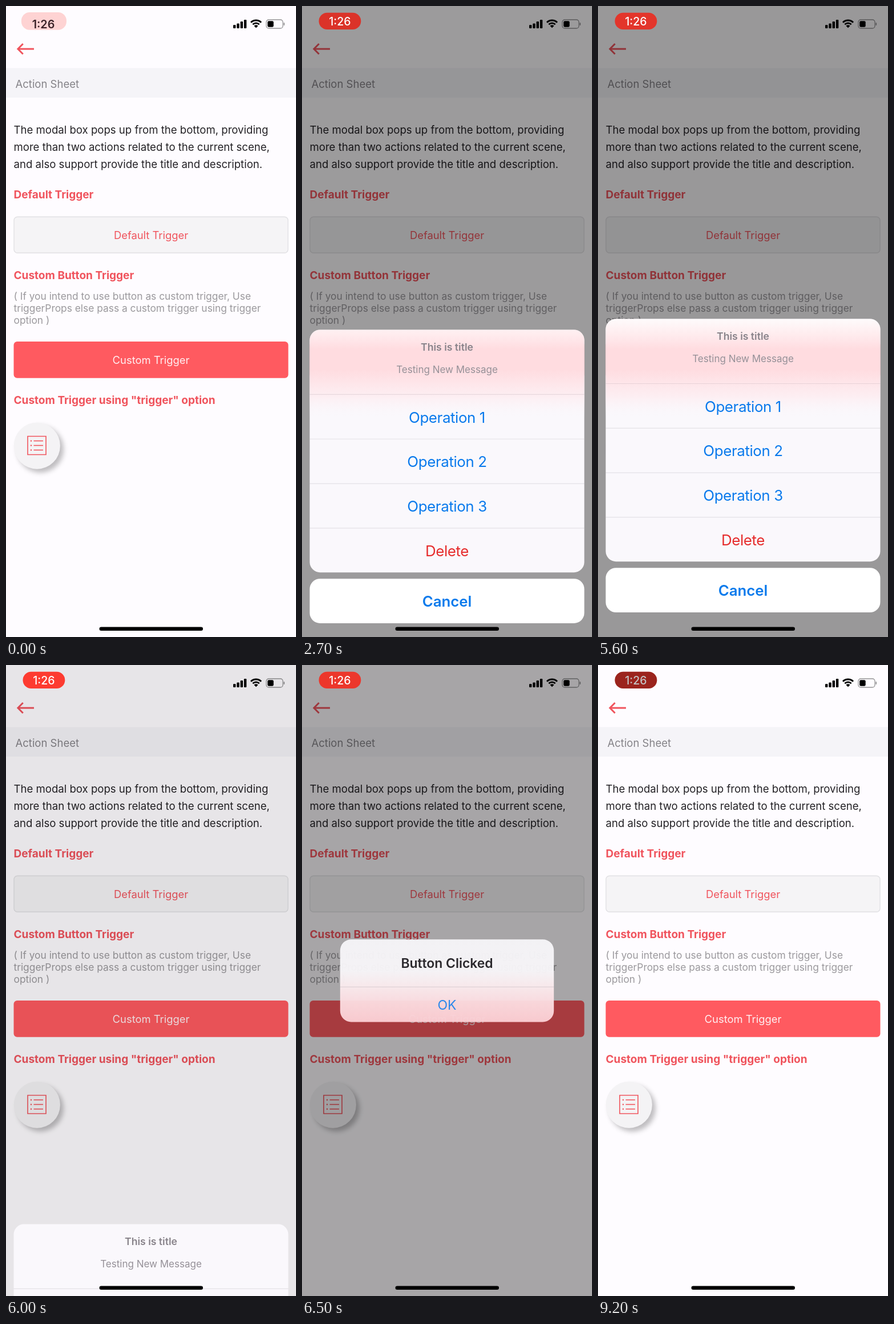
Write an HTML page with a canvas that moves like this. It is 508 by 1102 pixels and loops after 9.3 s.

```html
<!DOCTYPE html>
<html lang="en">
<head>
<meta charset="utf-8">
<title>Action Sheet</title>
<style>
  html, body { margin: 0; width: 100%; height: 100%; overflow: hidden; background: #fefcff; }
  canvas { display: block; width: 508px; height: 1102px; }
</style>
</head>
<body>
<canvas id="stage"></canvas>
<script>
const W = 508, H = 1102, LOOP = 9300, STEP = 100;
const MID = W / 2;
const RED = '#ff5a60', HEADING = '#f0545d', BLUE = '#0a7aec', BODY = '#242226';
const canvas = document.getElementById('stage');
const ctx = canvas.getContext('2d');
const ratio = window.devicePixelRatio || 1;
canvas.width = W * ratio;
canvas.height = H * ratio;

// Critically damped spring: the share of the way still to go.
const remaining = ms => {
  if (ms <= 0) return 1;
  const x = 18.26 * ms / 1000;
  return (1 + x) * Math.exp(-x);
};
const openness = (t, start, end) => t < end ? 1 - remaining(t - start) : remaining(t - end);

// y is the vertical middle of the capitals.
function text(str, x, y, size, color, { weight = 400, align = 'left', spacing = 0 } = {}) {
  ctx.font = `${weight} ${size}px Inter, sans-serif`;
  ctx.letterSpacing = spacing + 'px';
  ctx.textAlign = align;
  ctx.fillStyle = color;
  ctx.fillText(str, x, y + size * 0.364);
}

function box(x, y, w, h, r, fill, stroke, lineWidth = 1.4) {
  ctx.beginPath();
  ctx.roundRect(x, y, w, h, r);
  if (fill) {
    ctx.fillStyle = fill;
    ctx.fill();
  }
  if (stroke) {
    ctx.strokeStyle = stroke;
    ctx.lineWidth = lineWidth;
    ctx.stroke();
  }
}

function line(points, color, width) {
  ctx.beginPath();
  points.forEach(([x, y]) => ctx.lineTo(x, y));
  ctx.strokeStyle = color;
  ctx.lineWidth = width;
  ctx.stroke();
}

function gradient(y0, y1, stops) {
  const g = ctx.createLinearGradient(0, y0, 0, y1);
  stops.forEach(([at, color]) => g.addColorStop(at, color));
  return g;
}

function drawStatusIcons() {
  [6, 8.5, 12, 15].forEach((h, i) => box(398 + i * 6.3, 39 - h, 4.4, h, 1.2, '#000'));

  const from = -Math.PI * 0.75, to = -Math.PI * 0.25;
  ctx.strokeStyle = ctx.fillStyle = '#000';
  ctx.lineWidth = 2.8;
  for (const r of [12.8, 8]) {
    ctx.beginPath();
    ctx.arc(438, 37.8, r, from, to);
    ctx.stroke();
  }
  ctx.beginPath();
  ctx.moveTo(438, 38.2);
  ctx.arc(438, 38.2, 5, from, to);
  ctx.fill();

  box(456, 24, 29, 15, 4.3, null, 'rgba(0,0,0,.42)', 1.3);
  box(458.2, 26.2, 10.5, 10.6, 2.2, '#000');
  box(486.3, 29, 1.8, 5, 1, 'rgba(0,0,0,.42)');
}

function drawListButton() {
  ctx.save();
  ctx.shadowColor = 'rgba(0,0,0,.25)';
  ctx.shadowBlur = 9 * ratio;
  ctx.shadowOffsetX = ctx.shadowOffsetY = 6 * ratio;
  box(13.7, 727.5, 81.2, 81.2, 40.6, '#f4f3f5');
  ctx.restore();
  box(38, 751.5, 32, 32, 0, null, HEADING, 1.6);
  for (const y of [759.5, 767.5, 775.5]) {
    box(42.8, y - 1.2, 2.4, 2.4, 1.2, HEADING);
    line([[48.5, y], [65, y]], HEADING, 1.6);
  }
}

function drawPage() {
  ctx.fillStyle = '#fefcff';
  ctx.fillRect(0, 0, W, H);

  line([[21.5, 75], [49, 75]], HEADING, 3);
  line([[29.8, 66], [20.9, 75], [29.8, 84]], HEADING, 3);

  ctx.fillStyle = '#f5f4f8';
  ctx.fillRect(0, 108.5, W, 51.5);
  text('Action Sheet', 16.5, 136.5, 18.5, '#858388');

  ['The modal box pops up from the bottom, providing',
   'more than two actions related to the current scene,',
   'and also support provide the title and description.'
  ].forEach((str, i) => text(str, 13.5, 216 + i * 30, 18.58, BODY));

  const heading = (str, y) => text(str, 13.5, y, 19.05, HEADING, { weight: 700 });
  const label = (str, y, color) => text(str, MID, y, 18.4, color, { align: 'center' });

  heading('Default Trigger', 329);
  box(14, 368.2, 480, 63, 6, '#f5f4f6', '#e2e1e4');
  label('Default Trigger', 400, HEADING);

  heading('Custom Button Trigger', 470);
  ['( If you intend to use button as custom trigger, Use',
   'triggerProps else pass a custom trigger using trigger',
   'option )'
  ].forEach((str, i) => text(str, 13.5, 507 + i * 21, 17.36, '#9b999d'));

  box(13.5, 586, 481, 63.7, 6, RED);
  label('Custom Trigger', 618, '#fff0f2');

  heading('Custom Trigger using "trigger" option', 688.5);
  drawListButton();
  drawStatusIcons();
}

function drawBackdrop(amount) {
  ctx.fillStyle = `rgba(0,0,0,${0.4 * amount})`;
  ctx.fillRect(0, 0, W, H);
}

function drawSheet(open) {
  const top = 546.5 + (H - 546.5) * (1 - open);
  const centered = { align: 'center' };
  box(13.5, top, 481, 423.7, 18, '#faf8fc');

  // The red button glows through the panel at a fixed place on screen.
  ctx.save();
  ctx.clip();
  ctx.fillStyle = gradient(540, 720, [
    [0, 'rgba(255,255,255,.8)'], [0.1, 'rgba(255,244,245,.9)'],
    [0.33, 'rgba(255,220,224,1)'], [0.53, 'rgba(255,220,224,1)'],
    [0.8, 'rgba(253,238,242,.9)'], [1, 'rgba(250,248,252,0)']
  ]);
  ctx.fillRect(13, 540, 482, 180);
  ctx.restore();

  text('This is title', MID, top + 30.5, 17.6, '#88838a', { ...centered, weight: 600 });
  text('Testing New Message', MID, top + 69, 17, '#969198', centered);
  ['Operation 1', 'Operation 2', 'Operation 3', 'Delete'].forEach((str, i) => {
    const y = top + 113 + i * 77.8;
    line([[13.5, y], [494.5, y]], 'rgba(60,50,70,.11)', 1.2);
    text(str, MID, y + 39.7, 25.9, str === 'Delete' ? '#e62d2d' : BLUE, { ...centered, spacing: -0.4 });
  });
  box(13.5, top + 434.7, 481, 77.8, 18, '#fff');
  text('Cancel', MID, top + 474, 25.8, BLUE, { ...centered, weight: 600 });
}

// The panel stays denser than its labels while fading.
function drawAlert(open, scale) {
  const centerY = 551.3;
  ctx.save();
  ctx.globalAlpha = open ** 0.3;
  ctx.translate(MID, centerY);
  ctx.scale(scale, scale);
  ctx.translate(-MID, -centerY);
  box(71, 480.8, 366, 141, 19, gradient(481, 622, [
    [0, '#f6f5f8'], [0.38, '#f8f6f9'], [0.57, '#fbebee'],
    [0.76, '#fcdde1'], [1, '#fcd0d5']
  ]));
  ctx.globalAlpha = Math.sqrt(open);
  line([[71, 562], [437, 562]], 'rgba(60,50,70,.17)', 1.2);
  text('Button Clicked', MID, 521.5, 22.4, '#1b191d', { weight: 600, align: 'center' });
  text('OK', MID, 593, 22.5, '#1b82ec', { align: 'center' });
  ctx.restore();
}

function drawClock(t) {
  const appear = 1 - 0.79 * Math.max(0, 1 - t / 300);
  const grow = 2.6 * Math.max(0, 1 - t / 200);
  const level = 0.892 + 0.106 * Math.cos((t - 100) / 2000 * 2 * Math.PI);
  const color = [255, 59, 48].map(c => Math.round(c * level)).join();
  const pressed = t >= 9100;

  ctx.save();
  ctx.globalAlpha = appear;
  box(29.5 - grow, 11.8 - grow / 3, 73.8 + grow * 2, 29.2 + grow / 1.5, 14.6, `rgb(${color})`);
  ctx.restore();
  if (t < 100) {
    text('1:26', 65.5, 31.3, 19.8, '#3a2228', { weight: 600, align: 'center' });
  } else {
    text('1:26', 66.3, 26.5, 19.5, '#fff', { weight: 500, align: 'center' });
  }
  if (pressed) box(29.5, 11.8, 73.8, 29.2, 14.6, 'rgba(0,0,0,.23)');
}

function draw(t) {
  const sheet = openness(t, 2415, 5845);
  const alert = openness(t, 6310, 7934);
  ctx.setTransform(ratio, 0, 0, ratio, 0, 0);
  drawPage();
  if (sheet > 0.001) {
    drawBackdrop(sheet);
    drawSheet(sheet);
  }
  if (alert > 0.001) {
    drawBackdrop(alert);
    drawAlert(alert, 1 + 0.165 * remaining(t - 6310));
  }
  drawClock(t);
  box(163.5, 1084.5, 181.5, 6.6, 3.3, '#000');
}

const began = performance.now();
function tick() {
  const t = (performance.now() - began) % LOOP;
  draw(Math.floor(t / STEP) * STEP);
  requestAnimationFrame(tick);
}
tick();
</script>
</body>
</html>
```
